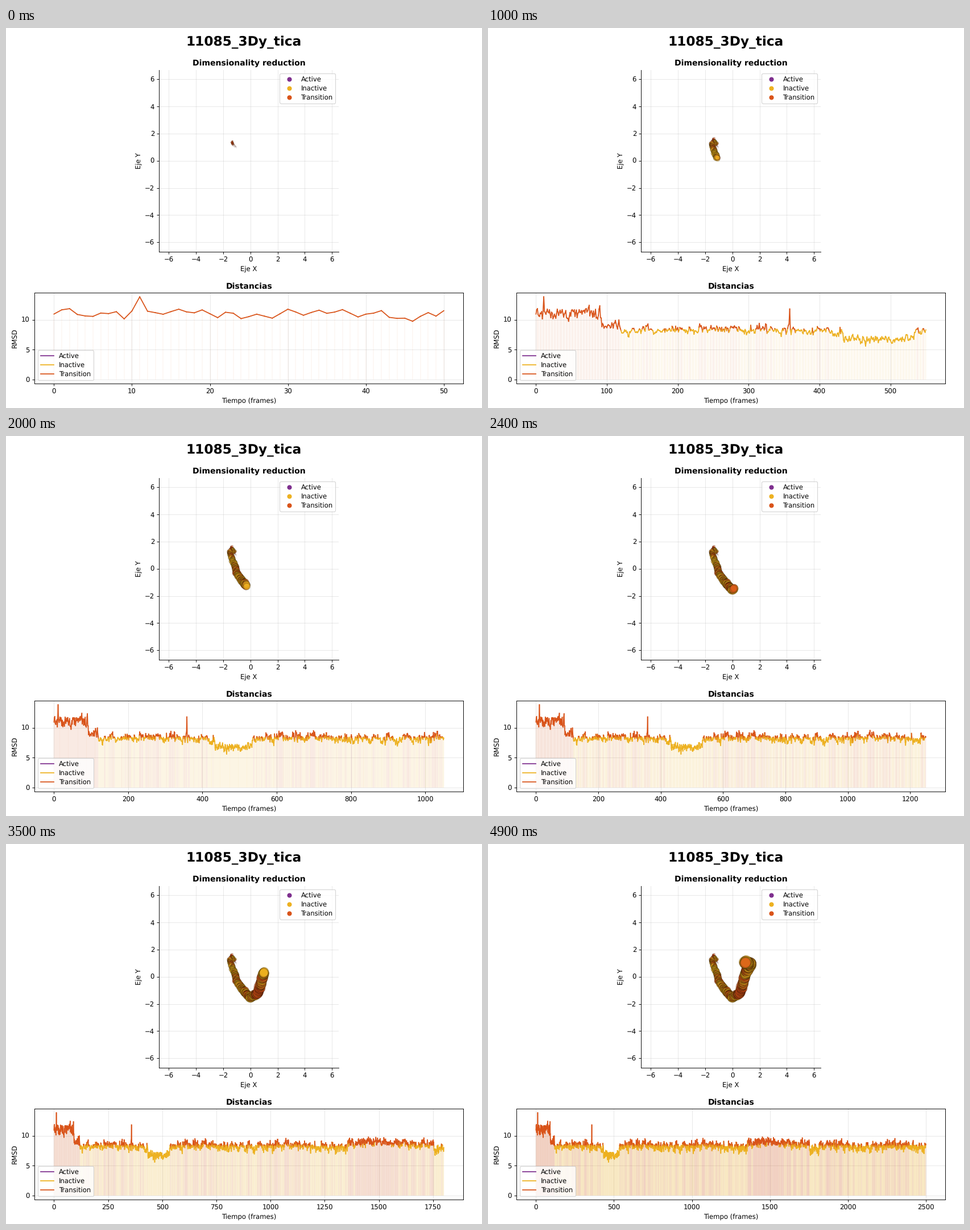
These frames come from a looping animation (837 px wide and 669 px high, 5 s). A matplotlib script:

```python
import numpy as np
import matplotlib.pyplot as plt
from matplotlib.animation import FuncAnimation
from matplotlib.collections import LineCollection
from matplotlib.colors import to_rgba
from matplotlib.lines import Line2D

WIDTH, HEIGHT, DPI = 837, 669, 83.625
FRAMES, STEP, INTERVAL = 50, 50, 100
TOTAL = FRAMES * STEP
THRESHOLD, PEAK = 8.4, 13.83
STATES = {"Active": "#7E2F8E", "Inactive": "#EDB120", "Transition": "#D95319"}

plt.rcParams.update({"font.family": "DejaVu Sans", "text.hinting": "none"})
rng = np.random.default_rng(11)
index = np.arange(TOTAL + 1)

# Start index and mean RMSD of each plateau
PLATEAUS = [(0, 11.3), (93, 9.0), (120, 8.2), (434, 6.9), (534, 8.25),
            (1355, 8.75), (1755, 7.8), (1815, 8.2)]
# Index, x and y of the turning points of the trajectory
WAYPOINTS = [(0, -1.05, 0.95), (15, -1.3, 1.25), (100, -1.4, 1.5),
             (150, -1.2, 1.3), (250, -1.55, 1.25), (550, -1.13, 0.2),
             (700, -1.0, -0.35), (1000, -0.4, -1.15), (1200, 0.0, -1.55),
             (1450, 0.57, -1.2), (1800, 1.0, 0.33), (2100, 1.35, 0.95),
             (2500, 0.95, 1.05)]


def wave(peak, period):
    return np.cos(2 * np.pi * (index - peak) / period)


def make_rmsd():
    starts, levels = np.array(PLATEAUS).T
    level = levels[np.searchsorted(starts, index, side="right") - 1]
    noise = np.clip(rng.normal(size=TOTAL + 1), -2.4, 2.4)
    noise[1:] = 0.9 * noise[1:] + 0.35 * noise[:-1]
    spread = np.where(index < 93, 0.6, 0.38)
    values = level + 0.25 * wave(150, 42) + 0.2 * wave(1895, 410)
    values += spread * noise
    values[[11, 358]] = PEAK, 11.8
    return values


def make_path():
    times, xs, ys = zip(*WAYPOINTS)
    centre = np.column_stack([np.interp(index, times, c) for c in (xs, ys)])
    return centre + rng.normal(scale=0.045, size=centre.shape)


def pixel_axes(left, top, right, bottom):
    return fig.add_axes([left / WIDTH, 1 - bottom / HEIGHT,
                         (right - left) / WIDTH, (bottom - top) / HEIGHT])


def decorate(ax, title, xlabel, ylabel):
    ax.set_title(title, fontsize=12, fontweight="bold", pad=6.6)
    ax.set_xlabel(xlabel)
    ax.set_ylabel(ylabel)
    ax.grid(alpha=0.3)


def add_legend(ax, loc, **style):
    handles = [Line2D([], [], color=color, label=name, **style)
               for name, color in STATES.items()]
    ax.legend(handles=handles, loc=loc, labelspacing=0.38)


def state_colors(alpha):
    inactive, transition = (to_rgba(STATES[name], alpha)
                            for name in ("Inactive", "Transition"))
    return np.where((rmsd > THRESHOLD)[:, None], transition, inactive)


rmsd = make_rmsd()
path = make_path()
points = np.column_stack([index, rmsd])
segments = np.stack([points[:-1], points[1:]], axis=1)
stems = np.stack([np.column_stack([index, 0 * rmsd]), points], axis=1)
line_colors, stem_colors, dot_colors = map(state_colors, (1, 0.045, 0.5))

fig = plt.figure(figsize=(10.009, 8), dpi=DPI, facecolor="white")
fig.suptitle("11085_3Dy_tica", fontsize=20, fontweight="bold")

map_ax = pixel_axes(269.2, 74, 585.2, 394.2)
decorate(map_ax, "Dimensionality reduction", "Eje X", "Eje Y")
map_ax.set(xlim=(-6.72, 6.5), ylim=(-6.71, 6.68),
           xticks=range(-6, 7, 2), yticks=range(-6, 7, 2))
map_ax.spines[["top", "right"]].set_visible(False)
add_legend(map_ax, "upper right", marker="o", ls="")
dots = map_ax.scatter([], [], edgecolors=[(0, 0, 0, 0.25)], linewidths=0.6,
                      zorder=3)

rmsd_ax = pixel_axes(50.1, 466, 804.1, 626.1)
decorate(rmsd_ax, "Distancias", "Tiempo (frames)", "RMSD")
rmsd_ax.set_ylim(-0.05 * PEAK, 1.05 * PEAK)
rmsd_ax.set_yticks([0, 5, 10])
add_legend(rmsd_ax, "lower left")
stem_lines = rmsd_ax.add_collection(
    LineCollection([], linewidths=1.5, zorder=2), autolim=False)
curve = rmsd_ax.add_collection(
    LineCollection([], linewidths=1.5, capstyle="projecting", zorder=3),
    autolim=False)


def update(frame):
    last = STEP * (frame + 1)
    dots.set_offsets(path[:last + 1])
    dots.set_sizes(index[:last + 1] / 10.5, DPI)
    dots.set_facecolor(dot_colors[:last + 1])
    stem_lines.set_segments(stems[:last + 1])
    stem_lines.set_color(stem_colors[:last + 1])
    curve.set_segments(segments[:last])
    curve.set_color(line_colors[:last])
    rmsd_ax.set_xlim(-0.05 * last, 1.05 * last)
    return dots, stem_lines, curve


animation = FuncAnimation(fig, update, frames=FRAMES, interval=INTERVAL,
                          init_func=lambda: update(0), repeat=True,
                          repeat_delay=0, blit=False)
plt.show()
```
